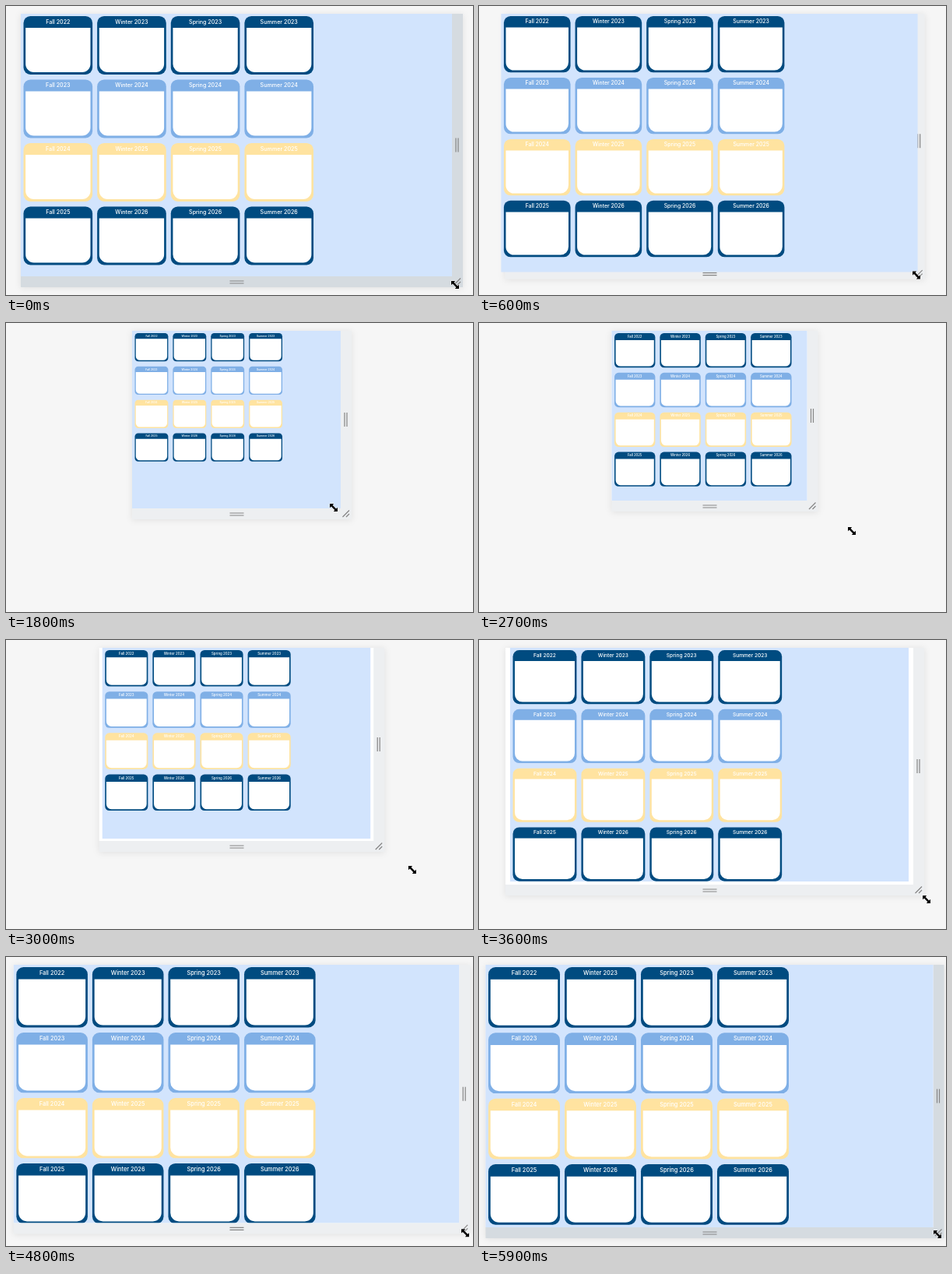
An HTML page that plays this animation: 600x371 px, repeating every 6000 ms.

```html
<!DOCTYPE html>
<html lang="en">
<head>
<meta charset="utf-8">
<title>Resizable term planner</title>
<style>
  html, body { margin: 0; width: 100%; height: 100%; overflow: hidden; background: #f6f6f6; }
  svg { display: block; width: 100vw; height: 100vh; }
  text { font: 500 8.05px Montserrat, Inter, sans-serif; fill: #fff; text-anchor: middle; }
  #frame { filter: drop-shadow(0 1px 4px rgba(0, 0, 0, .09)); }
  .grip { fill: none; stroke: #858585; stroke-width: 1.2; }
</style>
</head>
<body>
<svg id="stage" viewBox="0 0 600 371">
  <defs><clipPath id="clip"><rect id="clipBox" y="10"/></clipPath></defs>
  <rect id="frame" y="10"/>
  <rect id="paper" y="10" fill="#fff"/>
  <path id="gripX" class="grip" d="M-9 -1.5H9M-9 1.5H9"/>
  <path id="gripY" class="grip" d="M-1.5 -9V9M1.5 -9V9"/>
  <path id="gripXY" class="grip" d="M-4.5 4L4 -4.5M0 4L4 0"/>
  <rect id="content" y="10" fill="#d2e4fd"/>
  <g id="cards" clip-path="url(#clip)"></g>
  <path id="resize" stroke="#fff" stroke-width=".9" paint-order="stroke"
    d="M-5 -5H.2L-1.4 -3.2L3.2 1.4L5 -.2V5H-.2L1.4 3.2L-3.2 -1.4L-5 .2Z"/>
  <path id="arrow" stroke="#fff" stroke-width=".9" paint-order="stroke"
    d="M0 0V9L2 7.2L3.5 10.4L5 9.7L3.6 6.6H6.3Z"/>
</svg>
<script>
const NS = 'http://www.w3.org/2000/svg';
const LOOP = 6000, STEP = 100, CENTER = 303, TOP = 10, GUTTER = 14;
const GAP_X = 6, GAP_Y = 6.6;
const el = id => document.getElementById(id);

function set(node, attrs) {
  for (const name in attrs) node.setAttribute(name, attrs[name]);
  return node;
}
function add(parent, tag, attrs) {
  return parent.appendChild(set(document.createElementNS(NS, tag), attrs));
}
const move = (id, x, y) => set(el(id), { transform: `translate(${x} ${y})` });

// time, frame width, frame bottom, content width, content bottom, cursor x, cursor y
const KEYS = [
  [0, 568, 361, 568, 361, 577, 358],
  [200, 568, 361, 568, 361, 577, 358],
  [300, 560, 357, 568, 361, 577, 356],
  [500, 560, 357, 568, 361, 577, 356],
  [1100, 436, 319, 455, 328, 487, 293],
  [1200, 394, 300, 410, 308, 470, 281],
  [1800, 282, 252, 282, 252, 421, 237],
  [1900, 262, 243, 262, 243, 412, 230],
  [2200, 222, 222, 222, 222, 390, 212],
  [2600, 246, 233, 246, 233, 470, 262],
  [2700, 265, 242, 265, 242, 479, 267],
  [3300, 468, 302, 452, 296, 565, 323],
  [3600, 538, 328, 526, 324, 575, 333],
  [4000, 562, 339, 560, 338, 581, 338],
  [4300, 577, 346, 577, 346, 588, 350],
  [4700, 585, 354, 585, 354, 590, 355],
  [5000, 589, 358, 589, 358, 590, 353],
  [5100, 589, 358, 589, 358, 590, 353],
  [5500, 589, 361, 589, 361, 589, 356]
];

function pose(t) {
  const next = KEYS.findIndex(k => k[0] > t);
  if (next < 0) return KEYS[KEYS.length - 1].slice(1);
  const a = KEYS[next - 1], b = KEYS[next];
  const u = (t - a[0]) / (b[0] - a[0]);
  return a.slice(1).map((v, i) => v + (b[i + 1] - v) * u);
}

const COLORS = ['#004b80', '#7fafe6', '#ffe3a0', '#004b80'];
const TERMS = ['Fall', 'Winter', 'Spring', 'Summer'];
const cards = [];
COLORS.forEach((fill, row) => TERMS.forEach((term, col) => {
  const node = add(el('cards'), 'g', {});
  add(node, 'rect', { width: 100, height: 84.5, rx: 10, fill });
  add(node, 'path', { d: 'M3 17H97V69A12 12 0 0 1 85 81.3H15A12 12 0 0 1 3 69Z', fill: '#fff' });
  add(node, 'text', { x: 50, y: 11 }).textContent = `${term} ${2022 + row + (col > 0)}`;
  cards.push({ node, row, col });
}));

function box(id, width, bottom) {
  const x = CENTER - width / 2;
  set(el(id), { x, width, height: bottom - TOP });
  return x;
}
function innerBox(id, width, bottom) {
  const x = CENTER - width / 2;
  set(el(id), { x, width: width - GUTTER, height: bottom - GUTTER - TOP });
  return x;
}

// Gutters darken while the pointer rests on the corner.
function gutterColor(t) {
  const u = t < 300 ? 1 : Math.min(1, Math.max(0, (t - 5100) / 300));
  const mix = (a, b) => Math.round(a + (b - a) * u);
  return `rgb(${mix(237, 213)},${mix(239, 219)},${mix(241, 224)})`;
}

function draw(t) {
  const [width, bottom, innerWidth, innerBottom, cx, cy] = pose(t);

  const left = box('frame', width, bottom);
  set(el('frame'), { fill: gutterColor(t) });
  innerBox('paper', width, bottom);
  const gx = left + width - GUTTER / 2, gy = bottom - GUTTER / 2;
  move('gripX', CENTER - GUTTER / 2 + .5, gy + .5);
  move('gripY', gx - .5, (TOP + bottom - GUTTER) / 2);
  move('gripXY', gx, gy);

  const x0 = innerBox('content', innerWidth, innerBottom) + 3.5;
  innerBox('clipBox', innerWidth, innerBottom);
  const viewWidth = innerWidth - GUTTER;
  const cardWidth = viewWidth * (viewWidth < 260 ? .2087 : .16);
  for (const { node, row, col } of cards) {
    const x = x0 + col * (cardWidth + GAP_X);
    const y = 13 + row * (cardWidth * .845 + GAP_Y);
    set(node, { transform: `translate(${x} ${y}) scale(${cardWidth / 100})` });
  }

  const pointing = t >= 1000 && t <= 1200;
  set(move('resize', cx, cy), { visibility: pointing ? 'hidden' : 'visible' });
  set(move('arrow', cx, cy), { visibility: pointing ? 'visible' : 'hidden' });
}

const start = performance.now();
function tick() {
  const t = (performance.now() - start) % LOOP;
  draw(Math.floor(t / STEP) * STEP);
  requestAnimationFrame(tick);
}
tick();
</script>
</body>
</html>
```
